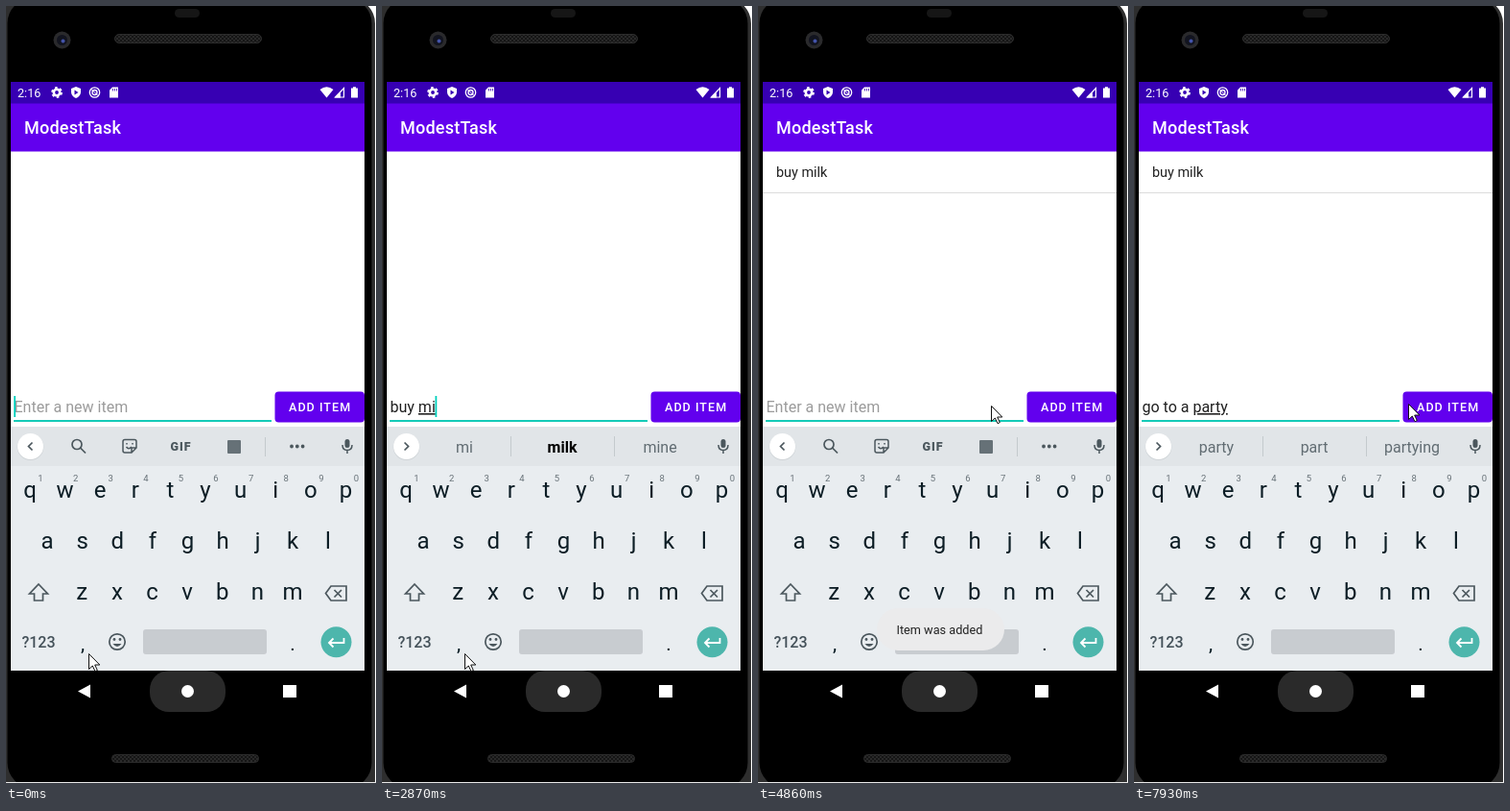
Recreate the animation shown at these times as an HTML page. Size 386x809 px, loop 8 s.

```html
<!DOCTYPE html>
<html lang="en">
<head>
<meta charset="utf-8">
<title>To-do list demo</title>
<style>
html, body { margin: 0; width: 100%; height: 100%; overflow: hidden; background: #fff; }
svg { display: block; width: 386px; height: 809px; font-family: Roboto, sans-serif; }
text { white-space: pre; }
.mid { text-anchor: middle; }
.line { fill: none; stroke: #4b575d; stroke-width: 1.7; }
.line.thin { stroke-width: 1.5; }
.white { fill: #fff; }
.key { font-size: 24px; fill: #0c1d25; }
.key.mark { font-size: 21px; }
.digit { font-size: 9.5px; fill: #687278; }
.hint { font-size: 16px; fill: #9b9b9b; }
.input { font-size: 16px; fill: #202020; }
.word { font-size: 16px; fill: #616c72; }
.word.bold { font-weight: 700; fill: #000; }
#composing { text-decoration: underline; text-decoration-thickness: 1px; }
</style>
</head>
<body>
<svg viewBox="0 0 386 809">
  <defs>
    <pattern id="mesh" width="4" height="4" patternUnits="userSpaceOnUse">
      <rect width="4" height="4" fill="#292929"/>
      <path d="M0 0L4 4M4 0L0 4" stroke="#151515"/>
    </pattern>
  </defs>

  <!-- Phone body -->
  <rect x="-20" y="-8" width="405" height="850" rx="26" fill="#2e2e2e"/>
  <rect x="1.500" y="-8" width="380" height="822" rx="26"/>
  <rect y="808" width="386" height="1" fill="#e8e8e8"/>
  <rect x="176" y="3" width="26" height="9" rx="4.500" fill="#161616"/>
  <circle cx="58.500" cy="35.500" r="9" fill="#2a2a2c"/>
  <circle cx="58.500" cy="35.500" r="5.500" fill="#12141f"/>
  <circle cx="59.500" cy="36.500" r="2" fill="#4353a8"/>
  <rect x="113.500" y="29.500" width="153" height="9" rx="4.500" fill="url(#mesh)" stroke="#2c2c2c"/>
  <rect x="110.500" y="779.500" width="153" height="8" rx="4" fill="url(#mesh)" stroke="#2c2c2c"/>

  <!-- App -->
  <rect x="5" y="79" width="369" height="613" fill="#fff"/>
  <rect x="5" y="101" width="369" height="50.500" fill="#6200ee"/>
  <rect x="5" y="79" width="369" height="22.500" fill="#3700b3"/>
  <text x="12" y="95" font-size="12.600" class="white">2:16</text>
  <g class="white">
    <circle cx="53" cy="90" r="3.200" fill="none" stroke="#fff" stroke-width="2.600"/>
    <circle cx="53" cy="90" r="5" fill="none" stroke="#fff" stroke-width="1.800" stroke-dasharray="2.600 2.636"/>
    <path d="M73 84L78 86V90Q77.500 94 73 96Q68.500 94 68 90V86Z"/>
    <path d="M71.500 87.500L75.500 90L71.500 92.500Z" fill="#3700b3"/>
    <circle cx="92.500" cy="90" r="5.200" fill="none" stroke="#fff" stroke-width="1.300"/>
    <circle cx="92.500" cy="90" r="2.500" fill="none" stroke="#fff" stroke-width="1.300"/>
    <path d="M89 86.500L96 93.500" stroke="#fff"/>
    <path d="M111 84.500H117V95.500H108V87.500Z"/>
    <path d="M111.500 86V88.500M113.500 86V88.500M115.500 86V88.500" stroke="#3700b3" stroke-width=".8"/>
    <path d="M327.500 87Q334.500 81.500 341.500 87L334.500 95.500Z"/>
    <path d="M343.500 95L352.500 85.500V95Z" fill="none" stroke="#fff" stroke-width="1.200"/>
    <path d="M343 95.500L349 89V95.500Z"/>
    <path d="M360 85.500H362V84.200H365V85.500H367V95.500H360Z"/>
  </g>
  <text x="19" y="133" font-size="18" font-weight="500" letter-spacing=".22" class="white">ModestTask</text>
  <g id="item">
    <text x="19" y="178" font-size="14.400" fill="#212121">buy milk</text>
    <path d="M5 194.500H374" stroke="#dcdcdc"/>
  </g>
  <text id="hint" x="8.500" y="423" class="hint">Enter a new item</text>
  <text id="input" x="8.500" y="423" class="input"><tspan id="done"></tspan><tspan id="composing"></tspan></text>
  <path d="M8 432H277" stroke="#14cbb8" stroke-width="2"/>
  <rect id="caret" y="406" width="1.800" height="22" fill="#03d0bd"/>
  <rect x="280.500" y="401.500" width="93.500" height="32" rx="4" fill="#6200ee"/>
  <rect id="press" x="280.500" y="401.500" width="93.500" height="32" rx="4" fill="#fff" opacity=".2"/>
  <text x="295" y="422" font-size="12.570" font-weight="500" letter-spacing="1.020" class="white">ADD ITEM</text>

  <!-- Keyboard -->
  <rect x="5" y="438" width="369" height="254" fill="#e9edf0"/>
  <rect x="5" y="438" width="369" height="41" fill="#e1e5e8"/>
  <circle cx="25.500" cy="459.200" r="13.800" fill="#cfd4d7"/>
  <circle cx="25.500" cy="458.500" r="13.500" class="white"/>
  <path id="chevron" class="line" d="M2 -4L-2 0L2 4"/>
  <g id="tools">
    <circle cx="74" cy="456.500" r="5" class="line"/>
    <path d="M77.500 460L83 465.500" class="line"/>
    <path d="M124 451.500H134Q136 451.500 136 453.500V460L131 465H124Q122 465 122 463V453.500Q122 451.500 124 451.500ZM131 465V460H136M125.500 459Q128 462.500 131 459M126 455V456.500M132 455V456.500" class="line thin"/>
    <text x="182.500" y="463" class="mid" font-size="12.500" font-weight="900" letter-spacing="1" fill="#4b575d">GIF</text>
    <rect x="231" y="452" width="14" height="14" rx="1" fill="#667177"/>
    <path d="M270.500 449V469" stroke="#c4cacd"/>
    <path d="M298 458.500H310" stroke="#4b575d" stroke-width="3.800" stroke-linecap="round" stroke-dasharray="0 5.800"/>
  </g>
  <g id="strip">
    <path d="M134.500 448V469M242.500 448V469" stroke="#c4cacd"/>
    <text class="word mid" x="86" y="465"></text>
    <text class="word mid" x="188" y="465"></text>
    <text class="word mid" x="290" y="465"></text>
    <g id="glass">
      <path d="M183 451H193L192 468H184Z" fill="#f8f9fa" stroke="#cfd5d8" stroke-width=".8"/>
      <path d="M183.300 455H192.700" stroke="#c5ccd0"/>
    </g>
  </g>
  <rect x="353.500" y="451" width="5" height="9" rx="2.500" fill="#4b575d"/>
  <path d="M351 457Q351 462.500 356 462.500T361 457M356 462.500V466" class="line thin"/>
  <g id="keys"></g>
  <path d="M34 602L43.500 612H38.500V619H29.500V612H24.500Z" class="line"/>
  <path d="M339 604H355V619H339L333.500 611.500ZM342.500 608L350 615.500M350 608L342.500 615.500" class="line"/>
  <text x="34" y="668" class="mid" font-size="16" font-weight="500" fill="#45525a">?123</text>
  <text x="80" y="671" class="key mark mid">,</text>
  <text x="299" y="671" class="key mark mid">.</text>
  <circle cx="116" cy="662" r="8.200" class="line"/>
  <path d="M111.500 664H120.500Q116 670 111.500 664Z" fill="#4b575d"/>
  <circle cx="113" cy="659.500" r="1.400" fill="#4b575d"/>
  <circle cx="119" cy="659.500" r="1.400" fill="#4b575d"/>
  <rect x="143" y="649" width="129" height="26" rx="3" fill="#c8ccd0"/>
  <circle cx="344.500" cy="662.200" r="16" fill="#4db6ac"/>
  <path d="M352.500 658V663H337.500M341.500 658.500L337 663L341.500 667.500" fill="none" stroke="#fff" stroke-width="1.800"/>

  <!-- Navigation -->
  <rect x="150" y="692" width="79" height="43" rx="20" fill="#2a2a2a"/>
  <circle cx="189.500" cy="713.500" r="6.500" class="white"/>
  <path d="M75 713.500L88 706.500V720.500ZM289 707H303V720H289Z" class="white"/>

  <g id="toast">
    <rect x="124" y="627" width="133" height="44" rx="22" fill="#ebebec"/>
    <text x="144.500" y="653.500" font-size="12.700" fill="#222">Item was added</text>
  </g>
  <path id="mouse" d="M.5 .5V16.500L4.300 13L7 18.700L9.300 17.600L6.700 12H11.800Z" fill="#fff" stroke="#111" stroke-linejoin="round"/>
</svg>
<script>
const LOOP = 8000;
const $ = id => document.getElementById(id);
const words = [...document.querySelectorAll('.word')];

// time, typed text, suggestions (* marks the bold one)
const typing = [
  [0, ''],
  [1080, 'b', 'b|but|be'],
  [1930, 'bu', 'b|but|be'],
  [2050, 'bu', 'bu|*buy|but'],
  [2170, 'buy', 'buy|but|buying'],
  [2460, 'buy ', 'the|a|it'],
  [2580, 'buy m', 'm|my|me'],
  [2750, 'buy mi', 'm|my|me'],
  [2870, 'buy mi', 'mi|*milk|mine'],
  [2990, 'buy mil', 'mil|*milk|mile'],
  [3260, 'buy milk', 'milk|GLASS|Hugo'],
  [4480, ''],
  [5970, 'g', 'g|good|go'],
  [6090, 'go', 'go|good|got'],
  [6210, 'go ', 'to|for|and'],
  [6330, 'go t', 't|to|the'],
  [6450, 'go to', 'to|too|top'],
  [6560, 'go to ', 'the|a|bed'],
  [6680, 'go to a', 'meeting|movie|different'],
  [6830, 'go to a ', 'meeting|movie|different'],
  [6950, 'go to a p', 'p|place|party'],
  [7240, 'go to a pa', 'pa|party|part'],
  [7360, 'go to a part', 'part|party|parts'],
  [7510, 'go to a party', 'party|part|partying']
];
const pointer = [
  [0, 86, 674], [3670, 136, 622], [3790, 232, 520], [3910, 312, 440], [4090, 337, 415],
  [4740, 292, 416], [4860, 243, 416], [5020, 208, 416], [5140, 201, 416], [7930, 286, 414]
];
const caretOn = [
  [0, 1], [150, 0], [710, 1], [1650, 0], [1930, 1], [3670, 0], [4090, 1],
  [4480, 0], [5020, 1], [5440, 0], [5970, 1], [7930, 0]
];
const toastAlpha = [[0, 0], [4620, .5], [4740, .85], [4860, 1], [6560, .8], [6680, .5], [6830, .2], [6950, 0]];

const at = (steps, t) => steps.findLast(s => s[0] <= t);
const show = (el, on) => { el.style.display = on ? '' : 'none'; };

function buildKeys() {
  const rows = [['qwertyuiop', 25, 512], ['asdfghjkl', 43, 565], ['zxcvbnm', 79.3, 618]];
  const label = (cls, x, y, s) => `<text class="${cls} mid" x="${x}" y="${y}">${s}</text>`;
  $('keys').innerHTML = rows.map(([letters, x0, y], row) =>
    [...letters].map((c, i) => {
      const x = x0 + i * 36.6;
      return label('key', x, y, c) + (row ? '' : label('digit', x + 11, 495, (i + 1) % 10));
    }).join('')).join('');
}

function drawInput(t) {
  const [, text, list] = at(typing, t);
  const composing = text.match(/\S*$/)[0];
  $('done').textContent = text.slice(0, text.length - composing.length);
  $('composing').textContent = composing;
  show($('hint'), !text);
  show($('tools'), !text);
  show($('strip'), text);
  $('chevron').setAttribute('transform', `translate(25.5 458.5) scale(${text ? -1 : 1} 1)`);
  $('caret').setAttribute('x', 8.2 + (text ? $('input').getComputedTextLength() : 0));
  show($('caret'), at(caretOn, t)[1]);

  const picks = (list || '||').split('|');
  show($('glass'), picks[1] === 'GLASS');
  words.forEach((el, i) => {
    el.textContent = picks[i] === 'GLASS' ? '' : picks[i].replace('*', '');
    el.classList.toggle('bold', picks[i].startsWith('*'));
  });
}

function draw() {
  const t = performance.now() % LOOP;
  drawInput(t);
  show($('item'), t >= 4480);
  show($('press'), t >= 4350 && t < 4620);
  $('toast').setAttribute('opacity', at(toastAlpha, t)[1]);
  const [, x, y] = at(pointer, t);
  $('mouse').setAttribute('transform', `translate(${x} ${y})`);
  requestAnimationFrame(draw);
}

buildKeys();
draw();
</script>
</body>
</html>
```
